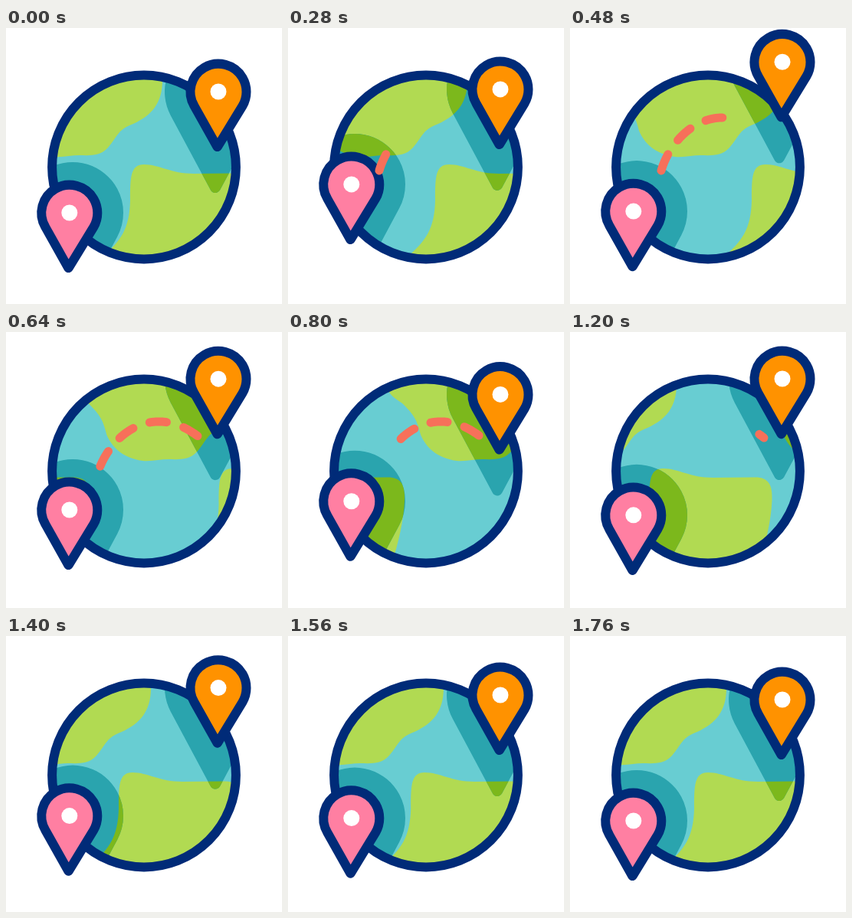
Write an HTML page with a canvas that moves like this. It is 360 by 360 pixels and loops after 2000 ms.

```html
<!DOCTYPE html>
<html lang="en">
<head>
<meta charset="utf-8">
<title>Globe with two pins</title>
<style>
html, body { margin: 0; width: 100%; height: 100%; overflow: hidden; background: #fff; }
canvas { display: block; width: 360px; height: 360px; }
</style>
</head>
<body>
<canvas id="stage" width="360" height="360"></canvas>
<script>
const canvas = document.getElementById('stage');
const ctx = canvas.getContext('2d');

const LOOP = 2000, STEP = 40, REST = 1760;
const NAVY = '#002b78', WATER = '#68cdd2', LAND = '#b1da52';
const DEEP = '#2aa4ae', GRASS = '#7cb81c';
const WRAP = 328, OUTLINE = 12;
const globe = { x: 180, y: 181.5, r: 119.9 };

const north = new Path2D('M-34 40 L204 40 L204 68 C204 98 190 114 166 125 ' +
  'C145 133 146 141 133 156 C122 168 108 166 95 166 C85 166 75 169 62 168 ' +
  'C35 164 22 150 15 134 C10 112 4 106 -9 93 C-19 86 -26 82 -29 72 Z');
const south = new Path2D('M124 300 C150 278 161 262 162 225 C162 195 162 178 180 178 ' +
  'C200 178 215 190 245 190 L300 189.5 C318 189.5 323 200 322 220 C321 245 314 275 306 300 Z');

// [time, value] pairs
const northKeys = [[0, 0], [280, 30], [480, 75], [800, 158], [1040, 216], [1400, 313], [REST, WRAP]];
const southKeys = [[0, 0], [280, 30], [480, 75], [800, 158], [1040, 226], [1400, 313], [REST, WRAP]];
const pinkKeys = [[0, 241], [240, 202], [520, 241], [780, 220.5], [1090, 241], [1370, 234.5], [REST, 241]];
const orangeKeys = [[0, 83], [240, 83], [460, 44], [850, 83], [1070, 61], [1190, 61], [REST, 83]];

function segment(keys, t) {
  let i = 0;
  while (i < keys.length - 2 && t > keys[i + 1][0]) i++;
  const u = (t - keys[i][0]) / (keys[i + 1][0] - keys[i][0]);
  return [i, Math.min(1, u)];
}

function swing(keys, t) {
  const [i, u] = segment(keys, t);
  const e = (1 - Math.cos(Math.PI * u)) / 2;
  return keys[i][1] + (keys[i + 1][1] - keys[i][1]) * e;
}

function glide(keys, t) {
  const [i, u] = segment(keys, t);
  const slope = k => k < 1 || k > keys.length - 2 ? 0 :
    (keys[k + 1][1] - keys[k - 1][1]) / (keys[k + 1][0] - keys[k - 1][0]);
  const [t0, a] = keys[i], [t1, b] = keys[i + 1];
  const d = t1 - t0, u2 = u * u, u3 = u2 * u;
  return a * (2 * u3 - 3 * u2 + 1) + b * (3 * u2 - 2 * u3) +
    d * (slope(i) * (u3 - 2 * u2 + u) + slope(i + 1) * (u3 - u2));
}

// Teardrop: a head circle joined by tangents to a small tip circle
function drop(x, y, r, dx, depth, tipR) {
  const a = Math.asin((r - tipR) / depth);
  const p = new Path2D();
  p.arc(x, y, r, Math.PI - a, a);
  p.arc(x + dx, y + depth, tipR, a, Math.PI - a);
  p.closePath();
  return p;
}

function pin(x, y, color) {
  const p = drop(x, y + 0.2, 36.5, -1.3, 71.6, 0.3);
  ctx.fillStyle = color;
  ctx.fill(p);
  ctx.strokeStyle = NAVY;
  ctx.lineWidth = OUTLINE;
  ctx.lineJoin = 'round';
  ctx.stroke(p);
  ctx.fillStyle = '#fff';
  ctx.beginPath();
  ctx.arc(x, y, 10.5, 0, 7);
  ctx.fill();
}

function surface(t, water, land) {
  ctx.fillStyle = water;
  ctx.fillRect(0, 0, 360, 360);
  ctx.fillStyle = land;
  for (const [shape, keys] of [[north, northKeys], [south, southKeys]]) {
    const shift = glide(keys, t);
    for (const dx of [shift, shift - WRAP]) {
      ctx.save();
      ctx.translate(dx, 0);
      ctx.fill(shape);
      ctx.restore();
    }
  }
}

// Route sampled by arc length
const route = [];
for (let i = 0, len = 0; i <= 240; i++) {
  const u = i / 240, v = 1 - u;
  const mix = (a, b, c, d) => v * v * v * a + 3 * v * v * u * b + 3 * v * u * u * c + u * u * u * d;
  const x = mix(119, 134, 191, 253), y = mix(186, 135, 88.5, 138);
  if (i) len += Math.hypot(x - route[i - 1].x, y - route[i - 1].y);
  route.push({ x, y, len });
}
const total = route[route.length - 1].len;
const unit = v => Math.max(0, Math.min(1, v));

function dashes(t) {
  const from = unit((t - 600) / 630) * total;
  const to = unit((t - 200) / 400) * total;
  ctx.strokeStyle = '#f7705a';
  ctx.lineWidth = 11;
  ctx.lineCap = ctx.lineJoin = 'round';
  for (let s = from; s < to; s += 45) {
    const end = Math.min(s + 23, to);
    ctx.beginPath();
    for (const p of route) if (p.len >= s && p.len <= end) ctx.lineTo(p.x, p.y);
    ctx.stroke();
  }
}

function draw(t) {
  const pinkY = swing(pinkKeys, t), orangeY = swing(orangeKeys, t);
  ctx.fillStyle = '#fff';
  ctx.fillRect(0, 0, 360, 360);

  const disc = new Path2D();
  disc.arc(globe.x, globe.y, globe.r, 0, 7);
  ctx.save();
  ctx.clip(disc);
  surface(t, WATER, LAND);
  for (const [x, y] of [[87, pinkY], [273, orangeY]]) {
    ctx.save();
    ctx.clip(drop(x, y, 66, 0, 125, 7));
    surface(t, DEEP, GRASS);
    ctx.restore();
  }
  ctx.restore();

  ctx.strokeStyle = NAVY;
  ctx.lineWidth = OUTLINE;
  ctx.stroke(disc);
  pin(277, orangeY, '#ff9200');
  pin(82.8, pinkY, '#ff7fa2');
  dashes(t);
}

const start = performance.now();
function tick() {
  const t = Math.max(0, performance.now() - start) % LOOP;
  draw(Math.min(REST, Math.floor(t / STEP) * STEP));
  requestAnimationFrame(tick);
}
tick();
</script>
</body>
</html>
```
